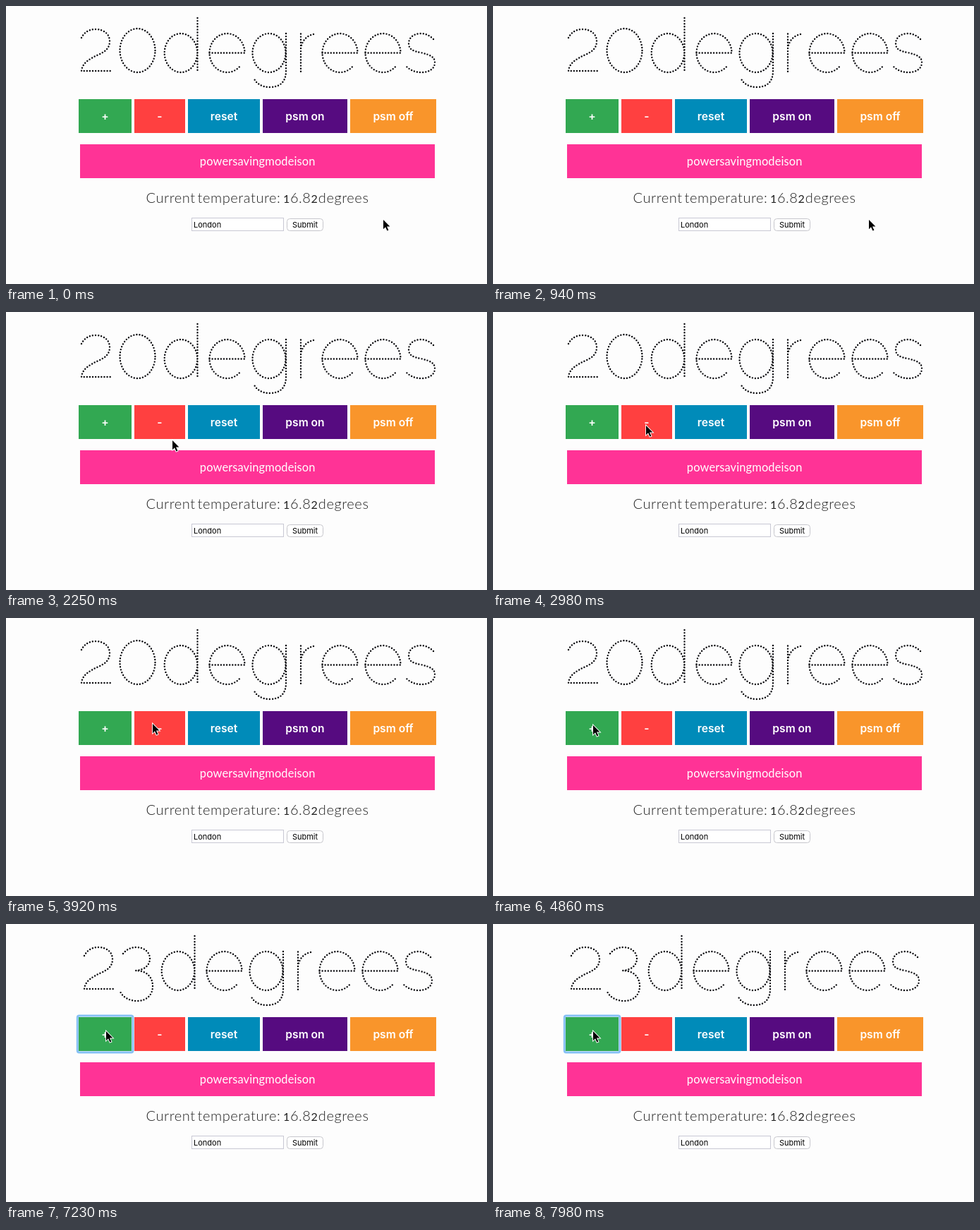
Recreate the animation shown at these times as an HTML page. Size 682 px wide and 394 px high, loop 8000 ms.

```html
<!DOCTYPE html>
<html lang="en">
<head>
<meta charset="utf-8">
<title>Thermostat</title>
<style>
  html, body { margin: 0; width: 100%; height: 100%; overflow: hidden; background: #fdfdfd; }
  svg { display: block; width: 682px; height: 394px; }
  .dots { fill: none; stroke: #08080c; stroke-width: 2.4; stroke-linecap: round; stroke-dasharray: 0 4.1; }
  .btn { font: 600 15.6px Inter, sans-serif; fill: #fff; text-anchor: middle; }
  .light { font: 300 20px Lato, sans-serif; letter-spacing: .6px; fill: #202020; }
  .light .low { font-size: 16px; font-weight: 400; }
  .banner { font: 400 16.4px Lato, sans-serif; letter-spacing: .15px; fill: #fff; text-anchor: middle; }
  .ui { font: 11px Inter, sans-serif; fill: #000; }
</style>
</head>
<body>
<svg viewBox="0 0 682 394">
  <g class="dots">
    <path id="tens"/>
    <path id="units"/>
    <path id="word"/>
  </g>
  <g id="buttons"></g>
  <rect id="ring" x="101.3" y="130" width="78.6" height="52" rx="2.5" fill="none" stroke="#86c1f5" stroke-width="3"/>
  <rect x="105" y="196" width="503" height="48" fill="#ff3396"/>
  <text class="banner" x="356.7" y="226">powersavingmodeison</text>
  <g class="light">
    <text x="198.5" y="279">Current</text>
    <text x="271.5" y="279">temperature:</text>
    <text x="393" y="279"><tspan class="low">1</tspan>6.8<tspan class="low">2</tspan></text>
    <text x="514.5" y="279" text-anchor="end">degrees</text>
  </g>
  <rect x="263.5" y="300.5" width="130" height="18" fill="#fff" stroke="#c8c8d4"/>
  <text class="ui" x="266" y="314">London</text>
  <rect x="398.5" y="301.5" width="51" height="17" rx="4" fill="#fff" stroke="#c6c6cc"/>
  <text class="ui" x="424" y="314" text-anchor="middle">Submit</text>
  <path id="cursor" d="M1 2V15.2L4 12.3L6.4 17.6L8.4 16.7L6 11.5H10.4Z" fill="#000" stroke="#fff" stroke-width="1.8" paint-order="stroke"/>
</svg>
<script>
const $ = id => document.getElementById(id);
const LOOP = 8000;

const ellipse = (cx, cy, rx, ry) =>
  `M${cx + rx} ${cy}a${rx} ${ry} 0 1 0 ${-2 * rx} 0a${rx} ${ry} 0 1 0 ${2 * rx} 0`;
const letterE = x => `M${x} 66.5h50a25 27.5 0 1 0 -6 17.9`;

const digits = {
  0: ellipse(25.5, 63, 25, 31),
  1: 'M0 42L12 33V93',
  2: 'M0 45C4 37 11 33 20 33C32 33 40 40 40 50C40 60 33 65 24 69C11 75 1 81 0 92H43',
  3: 'M4 42C9 36 15 33 23 33C34 33 42 40 42 49C42 58 35 65 22 66C37 66 46 75 46 88C46 101 37 109 24 109C13 109 4 104 0 96'
};

$('word').setAttribute('d', [
  ellipse(248, 66.5, 23.3, 27.5), 'M271.5 17V94',
  letterE(288.5),
  ellipse(373, 66.5, 23.5, 27.5), 'M397 39V92C397 108 388 115 374 115C363 115 354 110 351 101',
  'M418 39.5V94M418 60C420 47 429 40 440 39.5',
  letterE(448.5), letterE(509.5),
  'M606 47C601 42 595 39 588 39C578 39 571 45 571 53C571 62 578 64 588 66C601 69 608 72 608 80C608 89 600 94 589 94C580 94 573 91 567 85'
].join(''));

$('buttons').innerHTML = [
  ['+', 103, 75, '#32a852'],
  ['-', 182, 72, '#ff4040'],
  ['reset', 258, 102, '#008bb9'],
  ['psm on', 364, 120, '#560b80'],
  ['psm off', 488, 122, '#f9952b']
].map(([label, x, w, color]) =>
  `<rect x="${x}" y="132" width="${w}" height="48" fill="${color}"/>` +
  `<text class="btn" x="${x + w / 2}" y="162">${label}</text>`
).join('');

// start time, unit digit, x of tens, x of units, shift of the word
const readings = [
  [0, 0, 107, 161, 0],
  [5670, 1, 125, 179, -18],
  [6200, 2, 111, 166, -5],
  [6900, 3, 111, 162, -4]
];

// start, end, target x, target y
const moves = [
  [0, 1, 534, 301],
  [900, 1690, 269, 245],
  [1790, 2250, 235, 180],
  [2500, 3280, 207, 148],
  [4200, 4860, 141, 150]
];

const ease = k => k * k * (3 - 2 * k);

function cursorAt(t) {
  let [, , x, y] = moves[0];
  for (const [start, end, tx, ty] of moves) {
    const k = ease(Math.min(1, Math.max(0, (t - start) / (end - start))));
    x += (tx - x) * k;
    y += (ty - y) * k;
  }
  return [x, y];
}

const shift = (el, x, y = 0) => el.setAttribute('transform', `translate(${x} ${y})`);

function draw(t) {
  const [, unit, tensX, unitsX, wordX] = readings.filter(r => r[0] <= t).pop();
  $('tens').setAttribute('d', digits[2]);
  $('units').setAttribute('d', digits[unit]);
  shift($('tens'), tensX);
  shift($('units'), unitsX);
  shift($('word'), wordX);
  $('ring').style.display = unit ? '' : 'none';
  const [x, y] = cursorAt(t);
  shift($('cursor'), Math.round(x), Math.round(y));
}

const begin = performance.now();
function tick() {
  draw((performance.now() - begin) % LOOP);
  requestAnimationFrame(tick);
}
tick();
</script>
</body>
</html>
```
